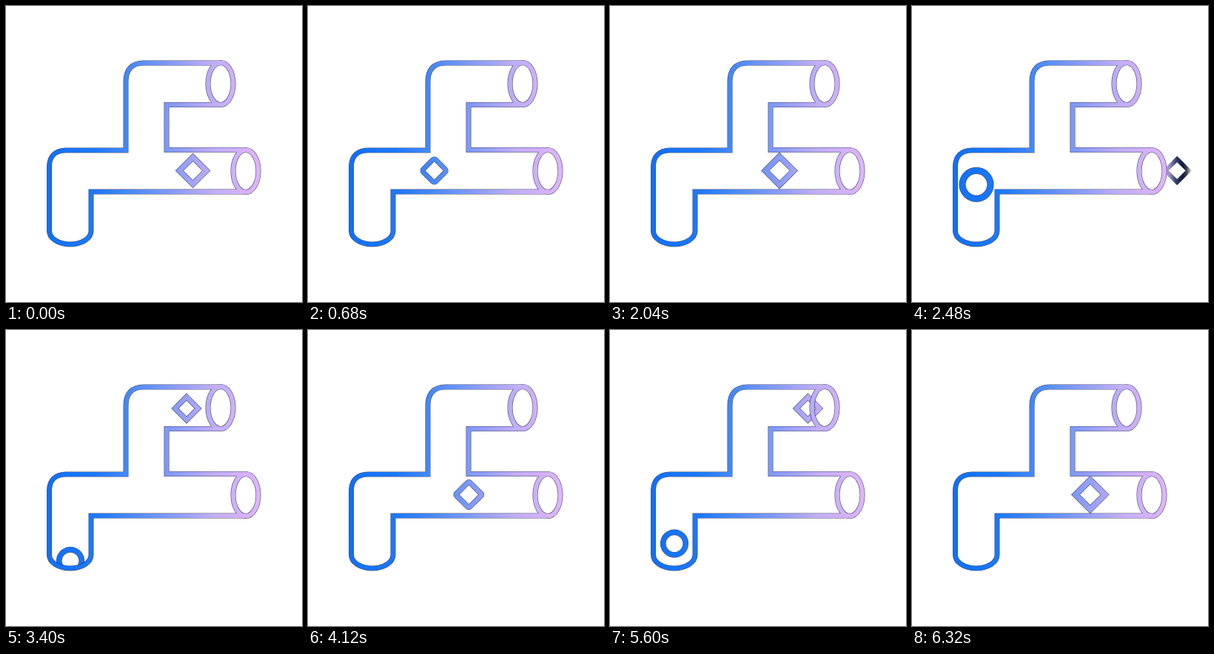
Animation of 400 by 400 pixels, one loop 6360 ms. Source, as an HTML page with a canvas:

```html
<!DOCTYPE html>
<html lang="en">
<head>
<meta charset="utf-8">
<title>Pipe flow</title>
<style>
  html, body { margin: 0; width: 100%; height: 100%; overflow: hidden; background: #fff; }
  canvas { display: block; width: 400px; height: 400px; }
</style>
</head>
<body>
<canvas id="stage" width="400" height="400"></canvas>
<script>
const ctx = document.getElementById('stage').getContext('2d');
const STEP = 40, PERIOD = 2120, SPEED = 0.2935;
const EDGE = 'rgba(10, 18, 54, 0.75)';

// x position and colour along the pipes
const TINTS = [
  [55, '#0f70f8'], [120, '#1c78f8'], [170, '#4a8af8'],
  [220, '#8099f7'], [280, '#c1adf7'], [344, '#e0b4fa']
];

// age in ms, outer side, corner share of side, line width
const MORPH = [
  [0, 37, 0.5, 6.5], [270, 37, 0.5, 6.5], [377, 46, 0.5, 8],
  [416, 38, 0.5, 7], [530, 29.5, 0.2, 5.6], [830, 29.5, 0.2, 5.6],
  [925, 36, 0, 7.4], [976, 32.5, 0, 6.8], [1060, 28, 0, 6]
];

function makeRoute(d) {
  const path = document.createElementNS('http://www.w3.org/2000/svg', 'path');
  path.setAttribute('d', d);
  return path;
}

// Colours follow x; past the mouth the tint darkens and fades away
function makePaint(mouth) {
  const left = 55, end = mouth ? mouth + 35 : 344;
  const paint = ctx.createLinearGradient(left, 0, end, 0);
  const add = (x, color) => paint.addColorStop((x - left) / (end - left), color);
  for (const [x, color] of TINTS) if (!mouth || x < mouth - 2) add(x, color);
  if (mouth) {
    add(mouth - 2, '#cfb0f7');
    add(mouth + 5, '#8c88b4');
    add(mouth + 13, '#333c6c');
    add(mouth + 22, '#10173c');
    add(mouth + 27, 'rgba(8, 12, 36, 0.8)');
    add(mouth + 35, 'rgba(8, 12, 36, 0)');
  }
  return paint;
}

const START = 'M87 352 V242.5 A20 20 0 0 1 107 222.5 H';
const items = [
  { born: -17, mouth: 310, route: makeRoute(START + '174 A16 16 0 0 0 190 206.5 V122 A16 16 0 0 1 206 106 H380') },
  { born: 1144, mouth: 344, route: makeRoute(START + '400') }
];
for (const item of items) {
  item.paint = makePaint(item.mouth);
  item.length = item.route.getTotalLength();
}

const pipePaint = makePaint();
const WALL = 'M290 77 H186 C170 77 162 86 162 102 V195 H81 C67 195 58.5 203 58.5 217 V304 ' +
  'A28.25 18 0 0 0 115 304 V251 H324';
const pipe = new Path2D(WALL + ' M324 194.5 H217 V133.5 H290');
for (const [x, y] of [[290, 105], [324, 223]]) {
  pipe.moveTo(x + 17, y);
  pipe.ellipse(x, y, 17, 28.5, 0, 0, Math.PI * 2);
}

// Pipe interior plus the open space in front of both mouths
const room = new Path2D(WALL + ' V194.5 H217 V133.5 H290 Z');
room.rect(290, 74, 110, 60);
room.rect(324, 194, 76, 58);

function morphAt(age) {
  const i = MORPH.findIndex(row => row[0] > age);
  if (i < 0) return MORPH[MORPH.length - 1].slice(1);
  const a = MORPH[i - 1], b = MORPH[i];
  const k = (age - a[0]) / (b[0] - a[0]);
  return a.slice(1).map((v, n) => v + (b[n + 1] - v) * k);
}

function strokeEdged(path, paint, width, edge) {
  if (edge) {
    ctx.strokeStyle = EDGE;
    ctx.lineWidth = width + 1.2;
    ctx.stroke(path);
  }
  ctx.strokeStyle = paint;
  ctx.lineWidth = width;
  ctx.stroke(path);
}

function drawItem(item, time) {
  const age = (time - item.born + PERIOD) % PERIOD;
  const dist = age * SPEED;
  if (dist >= item.length) return;
  const at = item.route.getPointAtLength(dist);
  const [side, corner, width] = morphAt(age);
  const size = side - width;
  const box = new Path2D();
  box.roundRect(-size / 2, -size / 2, size, size, Math.max(0, side * corner - width / 2));
  const shape = new Path2D();
  shape.addPath(box, new DOMMatrix().translate(at.x, at.y).rotate(45));
  strokeEdged(shape, item.paint, width, at.x < item.mouth - 20);
}

function draw(time) {
  ctx.clearRect(0, 0, 400, 400);
  ctx.save();
  ctx.clip(room);
  for (const item of items) drawItem(item, time);
  ctx.restore();
  strokeEdged(pipe, pipePaint, 5.8, true);
}

const begin = performance.now();
function tick() {
  const time = Math.max(0, performance.now() - begin);
  draw(Math.floor(time / STEP) * STEP % PERIOD);
  requestAnimationFrame(tick);
}
tick();
</script>
</body>
</html>
```
